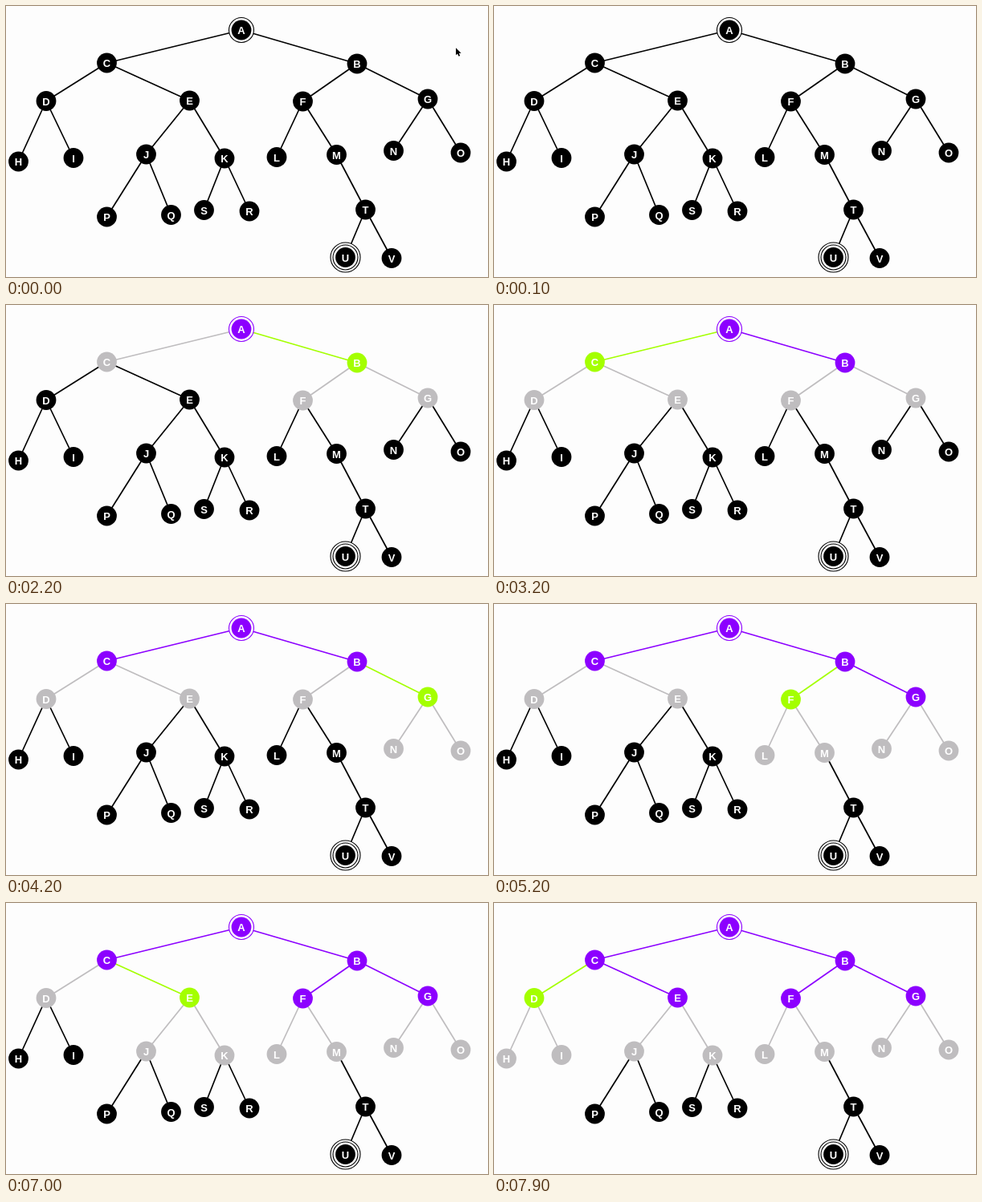
An HTML page with a canvas that plays this animation: 600x338 px, repeating every 8000 ms.

```html
<!DOCTYPE html>
<html lang="en">
<head>
<meta charset="utf-8">
<title>Tree search</title>
<style>
  html, body { margin: 0; width: 100%; height: 100%; overflow: hidden; background: #fdfdfd; }
  canvas { display: block; width: 600px; height: 338px; }
</style>
</head>
<body>
<canvas id="stage"></canvas>
<script>
const LOOP = 8000, FIRST = 1200, STEP = 1000;
const BACK = '#fdfdfd', UNSEEN = '#000', OPEN = '#bfbdbf', CURRENT = '#a4ff00', DONE = '#8c00ff';

const nodes = {
  A: [293, 30], B: [437, 72], C: [125.5, 71], D: [50, 118.5], E: [228.5, 118],
  F: [369.5, 119], G: [525, 116], H: [15.5, 194], I: [84, 189.5], J: [174.5, 185],
  K: [272, 190], L: [337, 188.5], M: [411.5, 185.5], N: [482.5, 180.5], O: [566, 183],
  P: [125.5, 263], Q: [205.5, 260.5], R: [303, 256], S: [246.5, 254.5],
  T: [447.5, 254], U: [422.5, 313.5], V: [480, 314.5]
};
const children = {
  A: 'CB', B: 'FG', C: 'DE', D: 'HI', E: 'JK', F: 'LM', G: 'NO',
  J: 'PQ', K: 'SR', M: 'T', T: 'UV'
};
const rings = { A: [15.5], U: [15.5, 18.5] };
const order = 'ABCGFED';

const parent = {};
for (const p in children) for (const c of children[p]) parent[c] = p;

const canvas = document.getElementById('stage');
const ctx = canvas.getContext('2d');
const ratio = window.devicePixelRatio || 1;
canvas.width = 600 * ratio;
canvas.height = 338 * ratio;
ctx.scale(ratio, ratio);
ctx.textAlign = 'center';
ctx.font = 'bold 13px "Liberation Sans", Arial, sans-serif';

function colorOf(id, step) {
  const at = order.indexOf(id);
  if (at >= 0 && at < step) return DONE;
  if (at >= 0 && at === step) return CURRENT;
  const up = order.indexOf(parent[id]);
  return up >= 0 && up <= step ? OPEN : UNSEEN;
}

function circle(x, y, r) {
  ctx.beginPath();
  ctx.arc(x, y, r, 0, 2 * Math.PI);
}

function drawEdge(id, step) {
  ctx.strokeStyle = colorOf(id, step);
  ctx.lineWidth = 1.7;
  ctx.beginPath();
  ctx.moveTo(...nodes[parent[id]]);
  ctx.lineTo(...nodes[id]);
  ctx.stroke();
}

function drawNode(id, step) {
  const [x, y] = nodes[id];
  const color = colorOf(id, step);
  const radii = rings[id] || [];
  if (radii.length) {
    ctx.fillStyle = BACK;
    circle(x, y, Math.max(...radii));
    ctx.fill();
  }
  ctx.strokeStyle = color;
  ctx.lineWidth = 1.1;
  for (const r of radii) {
    circle(x, y, r);
    ctx.stroke();
  }
  ctx.fillStyle = color;
  circle(x, y, 12.4);
  ctx.fill();
  ctx.fillStyle = '#fff';
  ctx.fillText(id, x, y + 5.3);
}

function drawPointer(x, y) {
  ctx.beginPath();
  for (const [dx, dy] of [[0, 0], [0, 9], [2, 7.2], [3.6, 10.5], [5.2, 9.8], [3.8, 6.6], [6.6, 6.4]])
    ctx.lineTo(x + dx, y + dy);
  ctx.closePath();
  ctx.fillStyle = '#000';
  ctx.fill();
}

function draw(t) {
  const step = Math.floor((t - FIRST) / STEP);
  ctx.fillStyle = BACK;
  ctx.fillRect(0, 0, 600, 338);
  for (const id in parent) drawEdge(id, step);
  for (const id in nodes) drawNode(id, step);
  if (t < 100) drawPointer(560, 52.3);
}

const start = performance.now();
function tick() {
  draw((performance.now() - start) % LOOP);
  requestAnimationFrame(tick);
}
tick();
</script>
</body>
</html>
```
